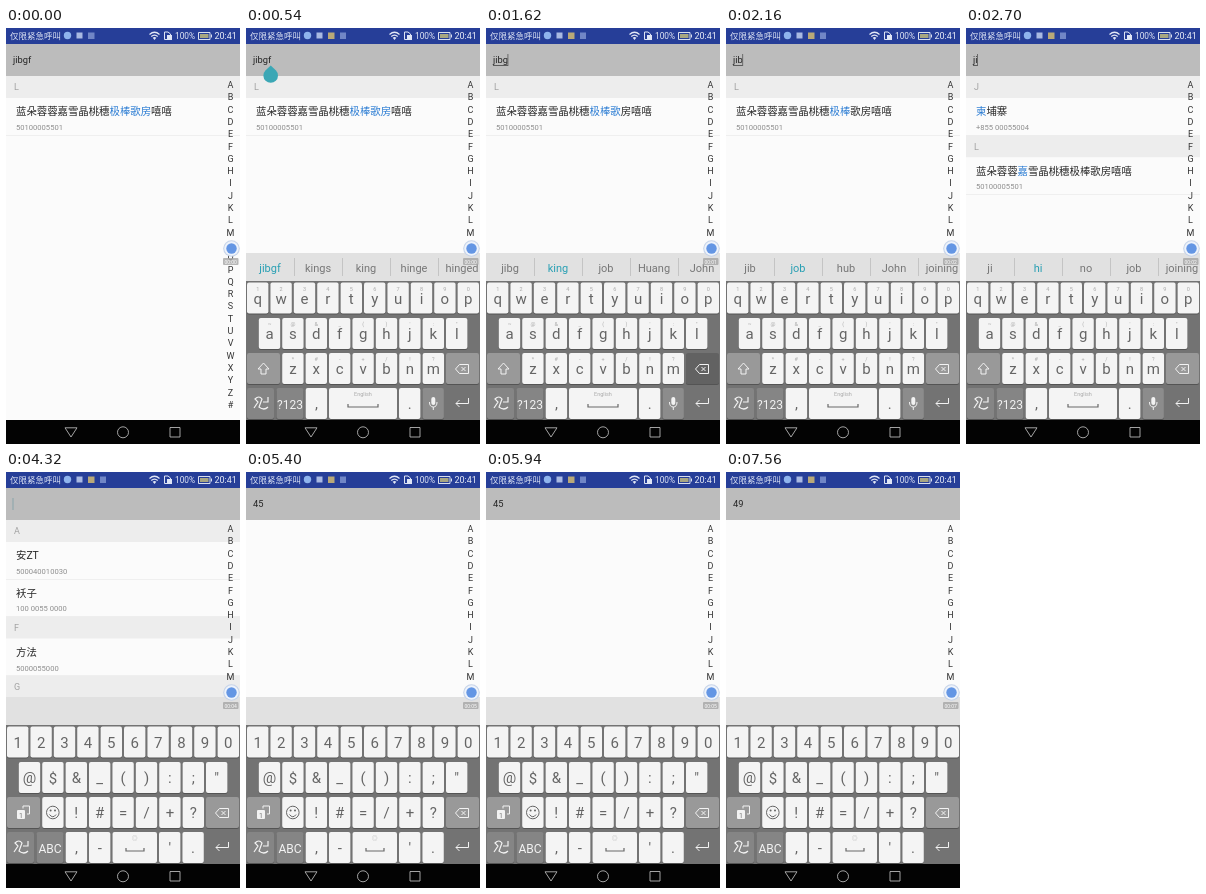
An HTML page with a canvas that plays this animation: 234x416 px, repeating every 8000 ms.

```html
<!DOCTYPE html>
<html lang="zh-CN">
<head>
<meta charset="utf-8">
<title>Contact search</title>
<style>
  html, body { margin: 0; width: 100%; height: 100%; overflow: hidden; background: #000; }
  canvas { display: block; width: 234px; height: 416px; }
</style>
</head>
<body>
<canvas id="stage"></canvas>
<script>
const W = 234, H = 416, LOOP = 8000, STEP = 540;
const FONT = 'Roboto, "Noto Sans CJK SC", "Noto Sans CJK", sans-serif';
const canvas = document.getElementById('stage');
const ratio = window.devicePixelRatio || 1;
canvas.width = W * ratio;
canvas.height = H * ratio;
const g = canvas.getContext('2d');
g.scale(ratio, ratio);

const BLUE = '#2b7cd3', TEAL = '#2aa0b4';
const LONG_NAME = '蓝朵蓉蓉嘉雪晶桃穗极棒歌房嘻嘻';
const longRow = match => ['L', [LONG_NAME, '50100005501', match]];
const country = match => ['J', ['柬埔寨', '+855 00055004', match]];
const first = match => ['A', ['安ZT', '500040010030', match]];
const byInitial = [...country('柬'), ...longRow('嘉')];
const everyone = [...first(), ['袄子', '100 0055 0000'], 'F', ['方法', '5000055000'], 'G'];
const withFour = [...first('4'), ...country('4')];

// One scene per step of the typing session.
const scenes = [
  { text: 'jibgf', rows: longRow('极棒歌房') },
  { text: 'jibgf', rows: longRow('极棒歌房'), keys: 'abc', words: 'jibgf kings king hinge hinged', pick: 0, handle: true },
  { text: 'jibgf', rows: longRow('极棒歌房'), keys: 'abc', words: 'jibgf kings king hinge hinged', pick: 0 },
  { text: 'jibg', rows: longRow('极棒歌'), keys: 'abc', words: 'jibg king job Huang John', pick: 1, composing: true, erase: true },
  { text: 'jib', rows: longRow('极棒'), keys: 'abc', words: 'jib job hub John joining', pick: 1, composing: true },
  { text: 'ji', rows: byInitial, keys: 'abc', words: 'ji hi no job joining', pick: 1, composing: true },
  { text: 'j', rows: byInitial, keys: 'abc', words: 'j I just is job', pick: 0, composing: true },
  { text: '', rows: everyone, keys: 'abc', words: '', cursor: true },
  { text: '', rows: everyone, keys: 'sym', cursor: true },
  { text: '4', rows: withFour, keys: 'sym' },
  { text: '45', rows: [], keys: 'sym' },
  { text: '45', rows: [], keys: 'sym' },
  { text: '4', rows: withFour, keys: 'sym' },
  { text: '4', rows: withFour, keys: 'sym' },
  { text: '49', rows: [], keys: 'sym' }
];

function rect(x, y, w, h, color, radius = 0) {
  g.fillStyle = color;
  g.beginPath();
  g.roundRect(x, y, w, h, radius);
  g.fill();
}

function disc(x, y, r, color) {
  g.fillStyle = color;
  g.beginPath();
  g.arc(x, y, r, 0, 7);
  g.fill();
}

function label(text, x, y, size, color, align = 'left') {
  g.font = `${size}px ${FONT}`;
  g.fillStyle = color;
  g.textAlign = align;
  g.fillText(text, x, y);
  return g.measureText(text).width;
}

function line(path, color, width = 1) {
  g.strokeStyle = color;
  g.lineWidth = width;
  g.stroke(new Path2D(path));
}

function shape(path, color) {
  g.fillStyle = color;
  g.fill(new Path2D(path));
}

function marked(text, match, x, y, size, color) {
  const at = match ? text.indexOf(match) : -1;
  if (at < 0) return label(text, x, y, size, color);
  const end = at + match.length;
  x += label(text.slice(0, at), x, y, size, color);
  x += label(match, x, y, size, BLUE);
  label(text.slice(end), x, y, size, color);
}

function statusBar(scene) {
  rect(0, 0, W, 16, '#263e98');
  label('仅限紧急呼叫', 4, 11.3, 8.5, '#dfe5f5');
  disc(61.5, 7.5, 3.7, '#8fb4ee');
  rect(70.5, 4.5, 6, 6, '#a9b9e2');
  rect(82, 4.5, 6.5, 6.5, scene.keys ? '#b9a878' : '#7186c6');
  if (scene.keys) rect(94, 4.5, 6, 6.5, '#7186c6');
  line('M143.5 6.5Q148.5 2 153.5 6.5M145.3 8.5Q148.5 5.7 151.7 8.5', '#e4e9f6', 1.2);
  shape('M146.7 9.8Q148.5 8.4 150.3 9.8L148.5 12Z', '#e4e9f6');
  line('M158.5 4H162L164.5 6V11.5H158.5Z', '#dfe5f5');
  rect(161, 7, 5, 5, '#dfe5f5');
  label('100%', 169, 11.2, 8.3, '#e4e9f6');
  line('M192.5 4.5H204V11.5H192.5ZM205.5 6.5V9.5', '#d9dfee');
  rect(194, 6, 8.5, 4, '#a8a682');
  label('20:41', 208.5, 11.4, 9, '#e8ecf7');
}

function searchBar(scene) {
  rect(0, 16, W, 32, '#bcbcbc');
  const width = label(scene.text, 7, 35.2, 9.3, '#252525');
  if (scene.composing) rect(7, 37, width, .8, '#444');
  if (scene.cursor || scene.composing) rect(6.6 + width, 26, .8, 12, scene.cursor ? '#7c9fa6' : '#555');
}

function contacts(rows) {
  rect(0, 48, W, 344, '#fbfbfb');
  let y = 48;
  for (const row of rows) {
    if (typeof row === 'string') {
      rect(0, y, W, 22, '#ededed');
      label(row, 8, y + 14.4, 9, '#a2a2a2');
      y += 22;
    } else {
      const [name, number, match] = row;
      marked(name, match, 10, y + 17.3, 10.4, '#292929');
      marked(number, match, 10, y + 32, 7.6, '#8d8d8d');
      rect(0, y + 37, W, .5, '#e4e4e4');
      y += 37.3;
    }
  }
  [...'ABCDEFGHIJKLMNOPQRSTUVWXYZ#'].forEach((letter, i) =>
    label(letter, 224.5, 60 + i * 12.3, 9, '#333', 'center'));
}

function key(x, y, w, text, style = {}) {
  const { fill = '#f4f4f4', color = '#656565', size = 15, hint = '' } = style;
  rect(x, y + 1, w, 31, '#545454', 2);
  rect(x, y, w, 31, fill, 2);
  label(text, x + w / 2, y + 21.2, size, color, 'center');
  label(hint, x + w / 2, y + 8, 5.5, '#aaa', 'center');
}

function keyRow(x, y, letters, hints = '') {
  [...letters].forEach((text, i) => key(x + i * 23.4, y, 21.4, text, { hint: hints[i] || '' }));
}

function keyboard(scene) {
  const gray = { fill: '#999', color: '#f2f2f2', size: 12 };
  const letters = scene.keys === 'abc';
  rect(0, 225, W, 28, '#e1e1e1');
  rect(0, 253, W, 139, '#737373');

  if (scene.words) scene.words.split(' ').forEach((word, i) => {
    label(word, 24 + i * 48, 243.7, 11, i === scene.pick ? TEAL : '#777', 'center');
    if (i) rect(i * 48, 230, .8, 18, '#bdbdbd');
  });

  keyRow(1, 254.5, letters ? 'qwertyuiop' : '1234567890', letters ? '1234567890' : '');
  keyRow(12.8, 290, letters ? 'asdfghjkl' : '@$&_():;"', letters ? '~@&_()\':"' : '');
  key(1, 325, 33, '', gray);
  keyRow(36.2, 325, letters ? 'zxcvbnm' : ' !#=/+?', letters ? '*#-+/!?' : '');
  key(200, 325, 33, '', { ...gray, fill: scene.erase ? '#626262' : '#999' });
  key(1, 360, 27, '', { ...gray, fill: '#858585' });
  key(30.5, 360, 27, letters ? '?123' : 'ABC', { ...gray, fill: '#858585' });
  key(59.7, 360, 21.4, ',');
  if (letters) {
    key(83, 360, 68, '', { hint: 'English' });
    key(153, 360, 21.4, '.');
    key(176.5, 360, 21.4, '', { fill: '#8c8c8c' });
    rect(185.3, 369, 4, 8, '#f2f2f2', 2);
    line('M183.5 374Q183.5 379 187.3 379Q191 379 191 374M187.3 379V382', '#f2f2f2');
    line('M102 376V379H132V376', '#686868', 1.2);
    line('M17.5 335L12 341H15V346H20V341H23Z', '#f2f2f2');
  } else {
    key(83, 360, 21.4, '-');
    key(106.5, 360, 44.5, '', { hint: '◎' });
    keyRow(153, 360, "'.");
    line('M120 376V379H138V376', '#686868', 1.2);
    rect(11, 338, 8, 9, '#f2f2f2', 1);
    label('1', 15, 345.5, 7, '#777', 'center');
    line('M17 336.5V334H23.5V342H21', '#f2f2f2');
    line('M40.5 340.5A6.3 6.3 0 1 1 53.1 340.5A6.3 6.3 0 1 1 40.5 340.5M43.5 342.5Q46.8 347 50.1 342.5', '#666');
    disc(44.6, 338.5, 1, '#666');
    disc(49, 338.5, 1, '#666');
  }
  line('M209.5 341L213.5 336.5H222.5V345.5H213.5ZM215.5 339L219.5 343M219.5 339L215.5 343', '#f2f2f2');
  line('M222.5 370V375.5H210M213.5 372L210 375.5L213.5 379', '#f2f2f2');
  line('M8 380L12 374L9 371Q13 367 16 371L13 379Q18 383 22 379M17 374H22V369', '#f2f2f2', 1.2);
}

function navigation() {
  rect(0, 392, W, 24, '#030303');
  line('M59 399.8H71L65 409ZM111.5 404.3A5.5 5.5 0 1 1 122.5 404.3A5.5 5.5 0 1 1 111.5 404.3M164 399.5H174V409H164Z', '#b5b5b5', .9);
}

function floatingButton(seconds) {
  disc(225.5, 220.5, 8.3, '#c6d3e8');
  disc(225.5, 220.5, 7.2, '#eef3fb');
  disc(225.5, 220.5, 5.2, '#6496e4');
  rect(217, 230, 15.5, 7, 'rgba(165,165,165,.8)', 1);
  label(`00:0${seconds}`, 224.7, 235.5, 5, '#fff', 'center');
}

function draw(now) {
  const time = now % LOOP;
  const scene = scenes[Math.min(Math.floor(time / STEP), scenes.length - 1)];
  contacts(scene.rows);
  searchBar(scene);
  statusBar(scene);
  if (scene.keys) keyboard(scene);
  if (scene.handle) shape('M24.7 37.5L30 42.5A7.3 7.3 0 1 1 19.4 42.5Z', '#3ba7b5');
  floatingButton(Math.floor(time / 1000));
  navigation();
}

const start = performance.now();
function tick() {
  draw(performance.now() - start);
  requestAnimationFrame(tick);
}
tick();
</script>
</body>
</html>
```
